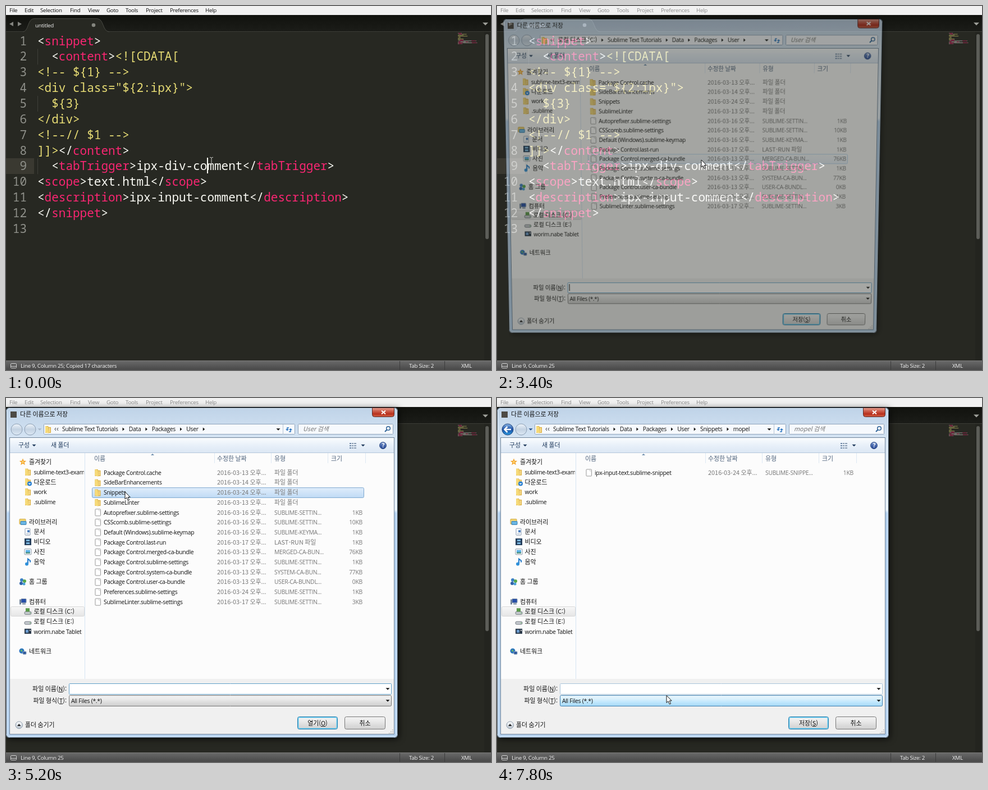
Write an HTML page with a canvas that moves like this. It is 864 px wide and 648 px high and loops after 8000 ms.

```html
<!DOCTYPE html>
<html lang="ko">
<head>
<meta charset="utf-8">
<title>Save snippet</title>
<style>
html, body { margin: 0; width: 100%; height: 100%; overflow: hidden; background: #272822; }
canvas { position: absolute; left: 0; top: 0; }
#dialog { transform-origin: 349px 310.5px; }
</style>
</head>
<body>
<canvas id="editor" width="864" height="648"></canvas>
<canvas id="dialog" width="864" height="648"></canvas>
<canvas id="pointer" width="864" height="648"></canvas>
<script>
const LOOP = 8000, STEP = 200;
const dialog = document.getElementById('dialog');
const layers = ['editor', 'dialog', 'pointer'].map(id => document.getElementById(id).getContext('2d'));
let g;

const COLORS = { w: '#f8f8f2', p: '#f92672', y: '#e6db74' };
// Each comma-separated run starts with its colour key.
const CODE = [
  'w<,psnippet,w>',
  'w  <,pcontent,w>,y<![CDATA[',
  'y<!-- ${1} -->',
  'y<div class="${2:ipx}">',
  'y  ${3}',
  'y</div>',
  'y<!--// $1 -->',
  'y]]>,w</,pcontent,w>',
  'w  <,ptabTrigger,w>ipx-div-comment</,ptabTrigger,w>',
  'w<,pscope,w>text.html</,pscope,w>',
  'w<,pdescription,w>ipx-input-comment</,pdescription,w>',
  'w</,psnippet,w>',
  'w'
].map(line => line.split(','));

const MENU = [['File', 6], ['Edit', 33], ['Selection', 61], ['Find', 114], ['View', 146], ['Goto', 179],
  ['Tools', 213], ['Project', 249], ['Preferences', 292], ['Help', 355]];

const SIDE = ['star:즐겨찾기', 'folder:sublime-text3-examples', 'download:다운로드', 'folder:work', 'folder:.sublime', '',
  'library:라이브러리', 'page:문서', 'film:비디오', 'photo:사진', 'music:음악', '', 'group:홈 그룹', '',
  'computer:컴퓨터', 'system:로컬 디스크 (C:)', 'disk:로컬 디스크 (E:)', 'device:worim.nabe Tablet', '', 'network:네트워크'];
const ROOTS = ['star', 'library', 'group', 'computer', 'network'];

const SETTINGS = 'SUBLIME-SETTIN...';
const USER_FILES = [
  ['Package Control.cache', 13], ['SideBarEnhancements', 14], ['Snippets', 24], ['SublimeLinter', 13],
  ['Autoprefixer.sublime-settings', 16, SETTINGS, 1],
  ['CSScomb.sublime-settings', 16, SETTINGS, 10],
  ['Default (Windows).sublime-keymap', 16, 'SUBLIME-KEYMA...', 1],
  ['Package Control.last-run', 17, 'LAST-RUN 파일', 1],
  ['Package Control.merged-ca-bundle', 13, 'MERGED-CA-BUN...', 76],
  ['Package Control.sublime-settings', 17, SETTINGS, 1],
  ['Package Control.system-ca-bundle', 13, 'SYSTEM-CA-BUN...', 77],
  ['Package Control.user-ca-bundle', 13, 'USER-CA-BUNDL...', 0],
  ['Preferences.sublime-settings', 24, SETTINGS, 1],
  ['SublimeLinter.sublime-settings', 17, SETTINGS, 3]
];
const FOLDERS = [
  { from: 0, files: USER_FILES },
  { from: 5400, files: [['mopel', 24]] },
  { from: 6600, files: [['ipx-input-text.sublime-snippet', 24, 'SUBLIME-SNIPPE...', 1]] }
];
const CRUMBS = ['Sublime Text Tutorials', 'Data', 'Packages', 'User', 'Snippets', 'mopel'];

// Pointer keys: time, x, y
const PATH = [[3800, 364, 274], [5000, 212, 167], [5400, 212, 167], [6000, 192, 133],
  [6600, 192, 133], [7400, 285, 512], [7800, 302, 529.5]];

function pointerAt(t) {
  let a = PATH[0];
  for (const b of PATH) {
    if (t < b[0]) {
      const p = Math.max(0, (t - a[0]) / (b[0] - a[0] || 1)), e = p * p * (3 - 2 * p);
      return [a[1] + (b[1] - a[1]) * e, a[2] + (b[2] - a[2]) * e];
    }
    a = b;
  }
  return a.slice(1);
}

function rect(c, x, y, w, h) { g.fillStyle = c; g.fillRect(x, y, w, h); }
function circle(c, x, y, r) { g.fillStyle = c; g.beginPath(); g.arc(x, y, r, 0, 7); g.fill(); }
function poly(c, ...p) {
  g.fillStyle = c;
  g.beginPath();
  for (let i = 0; i < p.length; i += 2) g.lineTo(p[i], p[i + 1]);
  g.closePath();
  g.fill();
}
function line(c, width, ...p) {
  g.strokeStyle = c;
  g.lineWidth = width;
  g.beginPath();
  for (let i = 0; i < p.length; i += 2) g.lineTo(p[i], p[i + 1]);
  g.stroke();
}
function shade(y, h, ...stops) {
  const s = g.createLinearGradient(0, y, 0, y + h);
  stops.forEach((c, i) => s.addColorStop(i / (stops.length - 1), c));
  return s;
}
function box(fill, border, x, y, w, h, r = 2, width = 1) {
  g.beginPath();
  g.roundRect(x, y, w, h, r);
  g.fillStyle = fill;
  g.fill();
  g.strokeStyle = border;
  g.lineWidth = width;
  if (border) g.stroke();
}
const down = (c, x, y, s = 4) => poly(c, x - s, y - s / 2, x + s, y - s / 2, x, y + s / 2);

// y is the middle of the capitals; an underscore underlines the next letter.
function text(s, x, y, color = '#111', align = 'left', size = 10.4, style = '') {
  const korean = /[가-힣]/.test(s), [head, tail] = s.split('_'), plain = s.replace('_', '');
  g.font = `${style} ${korean ? size * 1.05 : size}px ` +
    (korean ? '"Noto Sans CJK KR", "Noto Sans CJK JP", sans-serif' : '"Open Sans", "Noto Sans", sans-serif');
  g.letterSpacing = korean ? '0px' : '-0.3px';
  const w = g.measureText(plain).width;
  if (align === 'right') x -= w;
  if (align === 'center') x -= w / 2;
  g.fillStyle = color;
  g.fillText(plain, x, y + 3.7);
  if (tail) g.fillRect(x + g.measureText(head).width, y + 5, g.measureText(tail[0]).width, 1);
  return w;
}

const ICONS = {
  folder() {
    poly('#d9ab3c', -5, -6, 0, -6, 1, -4, 5, -4, 5, 6, -5, 6);
    poly('#f6da78', -5, -6, 0, -5, 1, 7, -5, 5);
    rect('#f3d684', 1, -3, 3, 8);
  },
  file() { box('#fff', '#999', -4.5, -6, 9.5, 12, 1); line('#ccc', 1, 2, -6, 2, -3, 5, -3); },
  star() {
    const p = [];
    for (let i = 0; i < 10; i++) {
      const r = i % 2 ? 2.8 : 6.5, a = i * Math.PI / 5;
      p.push(r * Math.sin(a), -r * Math.cos(a));
    }
    poly('#f2a22c', ...p);
    circle('#ffd36a', 0, 0, 2);
  },
  download() { ICONS.folder(); circle('#2a7fd0', 3, 3, 4); down('#fff', 3, 3.5, 2.5); },
  library() { box('#f1d777', '#cfa942', -6, -5, 11, 9, 1); box('#69b5e4', '#397fae', -4, -1, 10, 6, 1); },
  page() { box('#fff', '#8a9bb0', -5, -6, 9, 12, 1); rect('#4b7fc0', -1, -3, 4, 4); rect('#9ab', -3, 3, 5, 1); },
  film() { rect('#27415e', -6, -6, 12, 12); rect('#79b5df', -3, -4, 6, 3); rect('#79b5df', -3, 1, 6, 3); },
  photo() { box('#fff', '#8794a5', -6, -5, 12, 10, 1); rect('#55ace2', -4, -3, 8, 4); rect('#32816d', -4, 1, 8, 2); },
  music() { line('#2278c7', 2, 0, 4, 0, -5, 4, -2, 4, 1); circle('#2f91da', -2, 4, 3); },
  group() { circle('#3b7fc4', -2, -3, 3); circle('#58a84b', 3, -1, 3); circle('#2f62a8', -3, 3, 3); circle('#4aa0d8', 2, 4, 2.5); },
  computer() { box('#264fa8', '#8293a8', -3, -5, 9, 7, 1); rect('#73869c', -6, -4, 3, 9); rect('#73869c', -1, 3, 6, 2); },
  disk() { box('#c5c9ce', '#747b83', -6, 0, 12, 5, 2); rect('#58c354', 3, 2, 2, 1); },
  system() { ICONS.disk(); rect('#5b9b4b', -4, -6, 7, 6); },
  device() { rect('#283748', -6, -5, 12, 9); rect('#6c9cd0', -4, -3, 5, 5); rect('#ddd', 3, -3, 2, 2); },
  network() { circle('#2b75bd', -2, -1, 4.5); rect('#62b26a', -4, -3, 3, 3); box('#2d579e', '#9ab', 0, 0, 6, 5, 1); }
};
function icon(name, x, y) {
  g.save();
  g.translate(x, y);
  ICONS[name]();
  g.restore();
}

function caretAlpha(t) {
  const p = (t < 2400 ? t : t - 1000) % 1200;
  if (t >= 3200) return 0;
  return p < 200 || p >= 1000 ? 1 : p >= 400 && p < 800 ? 0 : .5;
}

function drawEditor(t) {
  rect('#272822', 0, 0, 864, 648);
  rect('#f1f1f1', 0, 0, 864, 16);
  for (const [s, x] of MENU) text(s, x, 7, t < 3400 ? '#111' : '#8c8c8c', 'left', 9.8);

  rect(shade(16, 29, '#11120e', '#1b1c18'), 0, 16, 864, 29);
  rect('#3c3d37', 0, 45, 864, 1);
  g.beginPath();
  g.moveTo(30, 46);
  g.bezierCurveTo(41, 45, 38, 22.5, 50, 22.5);
  g.lineTo(162, 22.5);
  g.bezierCurveTo(175, 22.5, 171, 45, 184, 46);
  g.fillStyle = '#272822';
  g.fill();
  g.strokeStyle = '#484943';
  g.lineWidth = 1;
  g.stroke();
  text('untitled', 52, 34, '#eee', 'left', 9.8);
  circle('#85867f', 156, 34, 3.3);
  poly('#83847f', 6, 32, 13, 28, 13, 36);
  poly('#83847f', 28, 32, 21, 28, 21, 36);
  down('#a0a19b', 854, 32, 5);

  rect('#3a3931', 0, 271, 50, 28);
  CODE.forEach((runs, i) => {
    const y = 69.5 + i * 27.86;
    g.font = '21px "Noto Sans Mono", "DejaVu Sans Mono", monospace';
    g.letterSpacing = '0px';
    g.fillStyle = '#8f908a';
    g.textAlign = 'right';
    g.fillText(i + 1, 37, y);
    g.textAlign = 'left';
    if (runs[0].startsWith('  ', 1)) rect('#3f4039', 56, y - 21, 1, 28);
    let col = 0;
    for (const run of runs) {
      const s = run.slice(1);
      g.fillStyle = COLORS[run[0]];
      g.fillText(s, 56 + col * 12.6, y);
      g.globalAlpha = .55;
      const pad = s.length - s.trimStart().length;
      g.fillRect(805 + (col + pad) * .78, 48 + i * 1.7, (s.length - pad) * .78, 1);
      g.globalAlpha = 1;
      col += s.length;
    }
  });
  g.globalAlpha = caretAlpha(t);
  rect('#f8f8f0', 358, 270, 2, 28);
  g.globalAlpha = 1;

  rect('#23241f', 852, 46, 12, 585);
  box('#5c5d58', '', 854, 50, 6, 365, 3);

  rect(shade(631, 17, '#6b6b6b', '#484848'), 0, 631, 864, 17);
  rect('#777', 0, 631, 864, 1);
  for (const x of [701, 781]) rect('#3c3c3c', x, 632, 1, 16);
  box('transparent', '#d5d5d5', 8.5, 636.5, 10, 8, 1);
  rect('#d5d5d5', 9, 641, 9, 1);
  text('Line 9, Column 25' + (t < 800 ? '; Copied 17 characters' : ''), 26, 640, '#f2f2f2', 'left', 9.8);
  text('Tab Size: 2', 718, 640, '#f2f2f2', 'left', 9.8);
  text('XML', 811, 640, '#f2f2f2', 'left', 9.8);
}

function drawFrame(crumbs, canGoBack, openEnd) {
  g.save();
  g.shadowColor = 'rgba(0,0,0,.7)';
  g.shadowBlur = 12;
  g.shadowOffsetX = 2;
  g.shadowOffsetY = 2;
  box('#b9d3ee', '', 0, 17, 698, 588, 6);
  g.restore();
  const glass = g.createLinearGradient(0, 17, 0, 604);
  [[0, '#bfd3e8'], [.1, '#d6e5f4'], [.31, '#e8f1fa'], [.32, '#b3d0ee'], [1, '#b9d4f0']].forEach(s => glass.addColorStop(...s));
  box(glass, '#34465a', .5, 17.5, 697, 587, 6);
  box('transparent', 'rgba(240,250,255,.75)', 1.5, 18.5, 695, 585, 5);
  rect('#4d4a45', 8, 24, 11, 11);
  text('다른 이름으로 저장', 25, 29);
  box(shade(17, 17, '#e9a99b', '#cf6553', '#b8301d', '#d5694c'), '#5b2a2a', 652.5, 17.5, 39, 16, [0, 0, 4, 4]);
  line('#fff', 2, 669, 22.5, 676, 28.5);
  line('#fff', 2, 676, 22.5, 669, 28.5);

  for (const x of [19, 43]) {
    const on = canGoBack && x === 19;
    box(on ? shade(46, 20, '#8cb8e8', '#1a4ea4', '#2b9be0') : shade(46, 20, '#eef4fa', '#c3d2e2', '#dce8f4'),
      on ? '#24477e' : '#8d9fb4', x - 10, 46, 20, 20, 10);
  }
  if (canGoBack) {
    line('#fff', 2.5, 13, 56, 25, 56);
    line('#fff', 2.5, 18.5, 51, 13.5, 56, 18.5, 61);
  }
  down(canGoBack ? '#25508a' : '#a9b9cb', 60, 56, 3.5);

  box('#f6f9fd', '#8fa3ba', 67.5, 46.5, 447, 18, 1);
  rect('#b4c3d4', 493, 47, 1, 18);
  icon('folder', 75, 56);
  line('#222', 1, 89, 53, 87, 55.5, 89, 58);
  line('#222', 1, 93, 53, 91, 55.5, 93, 58);
  let x = 100;
  crumbs.forEach((s, i) => {
    const end = x + text(s, x, 55.5);
    if (openEnd || i < crumbs.length - 1) poly('#111', end + 8, 52.5, end + 11.5, 55.5, end + 8, 58.5);
    x = end + 19.3;
  });
  down('#111', 485, 56, 3.5);
  line('#2b75c0', 1.5, 504, 53, 501, 53, 501, 57);
  line('#2b75c0', 1.5, 504, 60, 507, 60, 507, 56);
  down('#2b75c0', 501, 57, 3);
  poly('#2b75c0', 504, 57, 510, 57, 507, 54);
  box('#f6f9fd', '#8fa3ba', 520.5, 46.5, 169, 18, 1);
  text(crumbs.at(-1) + ' 검색', 529, 55.5, '#777', 'left', 10.4, 'italic');
  g.beginPath();
  g.arc(681, 54, 3.3, 0, 7);
  g.strokeStyle = '#2d6296';
  g.lineWidth = 1.5;
  g.stroke();
  line('#2d6296', 2, 678.5, 56.5, 675, 60);

  rect('#fcfcfc', 7, 71, 684, 527);
  g.strokeStyle = '#6f8398';
  g.lineWidth = 1;
  g.strokeRect(6.5, 70.5, 685, 528);
  rect(shade(71, 27, '#fafcfe', '#e8f0f9', '#dbe6f3'), 7, 71, 684, 26);
  rect('#b5c7dc', 7, 97, 684, 1);
  text('구성', 22, 84.5, '#1e395b');
  down('#1e395b', 50, 84.5, 3.5);
  text('새 폴더', 80, 84.5, '#1e395b');
  for (let i = 0; i < 3; i++) {
    rect('#6c86a5', 612, 80 + i * 4, 3, 2);
    rect('#8b9db2', 616, 80 + i * 4, 3, 2);
    rect('#8b9db2', 620, 80 + i * 4, 4, 2);
  }
  down('#1e395b', 636, 84.5, 3.5);
  box(shade(78, 13, '#7898d0', '#1d3f8f'), '#344f85', 665.5, 78.5, 12, 12, 6);
  text('?', 671.8, 84.5, '#fff', 'center', 10.4, 'bold');
}

function drawSidebar() {
  rect('#d5e4f3', 140, 98, 1, 402);
  box(shade(371, 18, '#f8f8f8', '#e5e5e5'), '#d9d9d9', 8.5, 371.5, 131, 17);
  g.save();
  g.beginPath();
  g.rect(7, 98, 132, 402);
  g.clip();
  SIDE.forEach((entry, i) => {
    if (!entry) return;
    const [name, label] = entry.split(/:(.*)/);
    const y = 114 + i * 17.75, root = ROOTS.includes(name);
    icon(name, root ? 30 : 39, y);
    text(label, root ? 41 : 49.5, y + .3);
  });
  g.restore();
}

function drawFiles(files, selected, hovered) {
  const head = '#4c607a';
  [['이름', 157], ['수정한 날짜', 376], ['유형', 478], ['크기', 579]].forEach(([s, x]) => text(s, x, 108.5, head));
  for (const x of [371, 472, 573, 640]) rect('#dde8f3', x, 98, 1, 18);
  poly('#6f8fae', 258, 102, 264, 102, 261, 99);
  files.forEach(([name, day, type, size], i) => {
    const y = 133 + i * 17.7;
    if (i === selected) box(shade(y - 9, 18, '#e0edfb', '#c0dbf5'), '#7da7cf', 153.5, y - 8.7, 484, 17.7);
    else if (i === hovered) box(shade(y - 9, 18, '#fafcfe', '#eaf3fc'), '#b9d7f1', 153.5, y - 8.7, 484, 17.7);
    icon(type ? 'file' : 'folder', 163.5, y);
    text(name, 174, y);
    text(`2016-03-${day} 오후...`, 376, y, '#777');
    text(type || '파일 폴더', 478, y, '#777');
    if (type) text(size + 'KB', 635, y, '#777', 'right');
  });
}

function drawFooter(t, action, fieldHover, comboHover) {
  rect('#f0f0f0', 7, 500, 684, 98);
  text('파일 이름(_N):', 108, 518, '#111', 'right');
  text('파일 형식(_T):', 108, 539, '#111', 'right');
  box('#fff', fieldHover || t < 5400 ? '#5f9fc9' : '#a9c4da', 112.5, 508.5, 574, 19, 1);
  if (t < 5000 && (t - 3400) % 1060 < 630) rect('#111', 115, 511, 1.2, 13);
  down('#111', 680, 518, 3.5);
  const face = (y, h) => shade(y, h, '#f2f2f2', '#ebebeb', '#dcdcdc', '#cfcfcf');
  box(comboHover ? shade(530, 18, '#eaf6fd', '#d9f0fc', '#bee6fd', '#a7d9f5') : face(530, 18),
    comboHover ? '#3c7fb1' : '#777', 112.5, 529.5, 574, 19);
  text('All Files (*.*)', 116, 539);
  down('#111', 680, 539, 3.5);

  box(face(567, 23), '#2f7ca8', 519.5, 567.5, 71, 22, 3);
  box('transparent', '#4fc3ef', 520.7, 568.7, 68.6, 19.6, 2, 1.3);
  text(action, 555, 579, '#111', 'center');
  box(face(567, 23), '#777', 603.5, 567.5, 72, 22, 3);
  text('취소', 639.5, 579, '#111', 'center');
  box(shade(576, 13, '#fff', '#b6c1cd'), '#8b9aa9', 17, 576, 12.5, 12.5, 6.2);
  poly('#222', 20, 584, 26.5, 584, 23.2, 580);
  text('폴더 숨기기', 34, 582.5);
  for (let i = 0; i < 3; i++) for (let j = 0; j <= i; j++) rect('#b5b5b5', 688 - j * 3, 590 + i * 3, 1.5, 1.5);
}

function drawDialog(t) {
  const opening = t < 3600;
  dialog.style.opacity = opening ? .59 : 1;
  dialog.style.transform = opening ? 'translateY(-4px) perspective(1300px) scale(.953) rotateX(-4deg)' : 'none';
  const depth = FOLDERS.findLastIndex(f => t >= f.from), { files } = FOLDERS[depth];
  const crumbs = CRUMBS.slice(0, 4 + depth);
  if (opening) crumbs.unshift('로컬 디스크 (C:)');
  const [x, y] = pointerAt(t);
  const selected = t >= 5000 && t < 5400 ? 2 : t >= 6400 && t < 6600 ? 0 : -1;
  const hovered = x > 153 && x < 638 ? Math.floor((y - 124.2) / 17.7) : -1;
  drawFrame(crumbs, depth > 0, depth < 2);
  drawSidebar();
  drawFiles(files, selected, hovered);
  drawFooter(t, selected < 0 ? '저장(_S)' : '열기(_O)', y > 508 && y < 528, y >= 529);
}

function drawPointer(t) {
  if (t < 3200) {
    line('#c9c9c5', 1, 363, 269.5, 365, 269.5, 366, 271, 366, 280, 365, 281.5, 363, 281.5);
    line('#c9c9c5', 1, 369, 269.5, 367, 269.5, 366, 271);
    line('#c9c9c5', 1, 366, 280, 367, 281.5, 369, 281.5);
    return;
  }
  g.save();
  g.translate(...pointerAt(t));
  poly('#fff', 0, 0, 0, 13, 3, 10.3, 5.4, 15.6, 7.6, 14.6, 5.2, 9.5, 9.2, 9.5);
  g.strokeStyle = '#111';
  g.lineWidth = 1;
  g.stroke();
  g.restore();
}

let last = -1;
function tick(now) {
  const t = Math.floor(now % LOOP / STEP) * STEP;
  if (t !== last) {
    last = t;
    [drawEditor, drawDialog, drawPointer].forEach((draw, i) => {
      g = layers[i];
      g.clearRect(0, 0, 864, 648);
      if (i !== 1 || t >= 3400) draw(t);
    });
  }
  requestAnimationFrame(tick);
}
requestAnimationFrame(tick);
</script>
</body>
</html>
```
